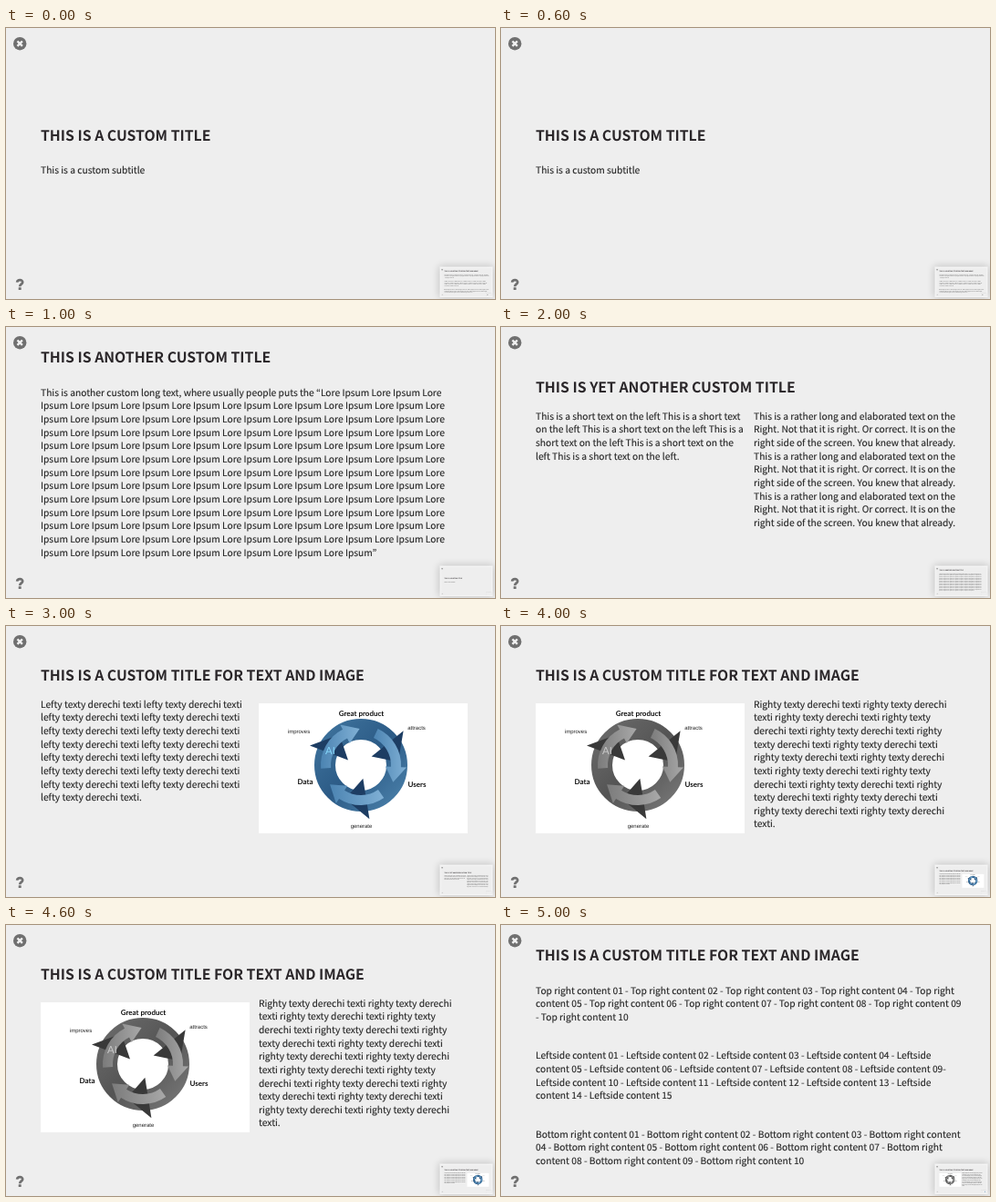
Animation, 536 px wide and 298 px high, one loop 6000 ms. Source, as an HTML page:

```html
<!DOCTYPE html>
<html lang="en">
<head>
<meta charset="utf-8">
<title>Slides</title>
<style>
  html, body { margin: 0; width: 100%; height: 100%; overflow: hidden; background: #eee; }
  svg { display: block; width: 536px; height: 298px; }
  text { font-family: "Noto Sans CJK JP", "Noto Sans CJK SC", "Noto Sans CJK", sans-serif; text-rendering: geometricPrecision; white-space: pre; }
  .title { font-size: 15.8px; font-weight: 700; fill: #2a2629; }
  .body { font-size: 10.25px; fill: #242424; stroke: #242424; stroke-width: .12px; }
  .label { font: bold 8px Lato, sans-serif; fill: #111; text-anchor: middle; }
  .note { font: 6px "Liberation Sans", sans-serif; fill: #222; text-anchor: middle; }
  .mark { font: 11.5px "Liberation Sans", sans-serif; fill: #86d8fb; }
  .gray { filter: grayscale(1); }
</style>
</head>
<body>
<svg viewBox="0 0 536 298">
  <defs>
    <linearGradient id="ring" x1="0" y1="0" x2="1" y2="1">
      <stop offset="0" stop-color="#3d719b"/><stop offset=".5" stop-color="#2c5b86"/><stop offset="1" stop-color="#477ca6"/>
    </linearGradient>
    <linearGradient id="arrow" x1="0" y1="0" x2="1" y2="0">
      <stop offset="0" stop-color="#4c84b2"/><stop offset="1" stop-color="#80b0d5"/>
    </linearGradient>
    <filter id="shadow" x="-30%" y="-40%" width="160%" height="180%"><feGaussianBlur stdDeviation="4"/></filter>
    <clipPath id="stage"><rect width="536" height="298"/></clipPath>
  </defs>
  <g id="show"></g>
</svg>
<script>
const SLIDE_MS = 1000, LINE = 14.65;

const text = (cls, x, y, s) => `<text class="${cls}" x="${x}" y="${y}">${s}</text>`;
const title = (y, s) => text('title', 38, y, s);
const body = (x, y, lines) => lines.map((s, i) => text('body', x, y + i * LINE, s)).join('');
const repeat = (n, s) => Array(n).fill(s);
const numbered = (name, from, to) =>
  Array.from({ length: to - from + 1 }, (_, i) => `${name} ${String(from + i).padStart(2, '0')}`).join(' - ');

const polar = (r, deg) => {
  const a = deg * Math.PI / 180;
  return `${(r * Math.cos(a)).toFixed(2)} ${(r * Math.sin(a)).toFixed(2)}`;
};

// Three-part cycle diagram on a white card, placed by its left edge.
function diagram(x, cls) {
  const heads = [-39, 81, 201].map(a =>
    `<path fill="#1d3d63" d="M${polar(60, a)}L${polar(15, a)}L${polar(41, a + 34)}Z"/>`).join('');
  const arrows = [175, 295, 55].map(a =>
    `<path fill="url(#arrow)" d="M${polar(44, a)}A44 44 0 0 1 ${polar(44, a + 68)}L${polar(50, a + 68)}
      L${polar(40, a + 93)}L${polar(27, a + 68)}L${polar(33, a + 68)}A33 33 0 0 0 ${polar(33, a)}Z"/>`).join('');
  return `<g class="${cls}" transform="translate(${x} 85)">
    <rect width="229" height="143" fill="#fff"/>
    <g transform="translate(112 68)">
      <circle r="39.5" fill="none" stroke="url(#ring)" stroke-width="23"/>${heads}${arrows}
      ${text('mark', -39, -12.5, 'AI')}
    </g>
    ${text('label', 112.5, 13.8, 'Great product')}${text('label', 51, 89, 'Data')}${text('label', 173.5, 91.5, 'Users')}
    ${text('note', 44, 33, 'improves')}${text('note', 173, 28.5, 'attracts')}${text('note', 112.5, 136.5, 'generate')}
  </g>`;
}

const IMAGE_TITLE = 'THIS IS A CUSTOM TITLE FOR TEXT AND IMAGE';
const slides = [
  title(124, 'THIS IS A CUSTOM TITLE') + body(38, 160.3, ['This is a custom subtitle']),

  title(39.3, 'THIS IS ANOTHER CUSTOM TITLE') + body(38, 75.7, [
    'This is another custom long text, where usually people puts the “Lore Ipsum Lore Ipsum Lore',
    ...repeat(11, 'Ipsum Lore '.repeat(8)),
    'Ipsum Lore '.repeat(6) + 'Ipsum”']),

  title(71.8, 'THIS IS YET ANOTHER CUSTOM TITLE') + body(38, 101.8, [
    'This is a short text on the left This is a short text',
    'on the left This is a short text on the left This is a',
    'short text on the left This is a short text on the',
    'left This is a short text on the left.']) +
  body(277, 101.8, repeat(3, [
    'This is a rather long and elaborated text on the',
    'Right. Not that it is right. Or correct. It is on the',
    'right side of the screen. You knew that already.']).flat()),

  title(59.5, IMAGE_TITLE) + body(38, 89.6, [
    'Lefty texty derechi texti lefty texty derechi texti',
    ...repeat(6, 'lefty texty derechi texti lefty texty derechi texti'),
    'lefty texty derechi texti.']) + diagram(277, ''),

  title(59.5, IMAGE_TITLE) + diagram(38, 'gray') + body(277, 89.6, [
    'Righty texty derechi texti righty texty derechi',
    ...repeat(2, [
      'texti righty texty derechi texti righty texty',
      'derechi texti righty texty derechi texti righty',
      'texty derechi texti righty texty derechi texti',
      'righty texty derechi texti righty texty derechi']).flat(),
    'texti.']),

  title(39.3, IMAGE_TITLE) + body(38, 75.7, [
    numbered('Top right content', 1, 4) + ' - Top right',
    'content 05 - ' + numbered('Top right content', 6, 9),
    '- Top right content 10']) +
  body(38, 147.2, [
    numbered('Leftside content', 1, 4) + ' - Leftside',
    'content 05 - ' + numbered('Leftside content', 6, 9) + '-',
    numbered('Leftside content', 10, 13) + ' - Leftside',
    'content 14 - Leftside content 15']) +
  body(38, 233.8, [
    numbered('Bottom right content', 1, 3) + ' - Bottom right content',
    '04 - ' + numbered('Bottom right content', 5, 7) + ' - Bottom right',
    'content 08 - ' + numbered('Bottom right content', 9, 10)])
];

const controls = `
  <circle cx="15.2" cy="17.2" r="7.2" fill="#707070"/>
  <path d="M12.5 14.5l5.4 5.4m0-5.4l-5.4 5.4" stroke="#f2f2f2" stroke-width="2.4"/>
  <path d="M12.1 279.6C12.6 276.5 18.2 276.3 18.2 279.5C18.2 281.8 15.2 281.6 15.2 284.3" fill="none" stroke="#707070" stroke-width="2.7"/>
  <rect x="13.7" y="285.3" width="3" height="2.8" rx=".5" fill="#707070"/>`;

// A slide carries a thumbnail of the previous one, which carries its own.
function render(index, depth) {
  const previous = (index + slides.length - 1) % slides.length;
  const thumbnail = depth === 0 ? '' : `
    <rect x="475" y="262" width="59" height="34" fill="#000" opacity=".2" filter="url(#shadow)"/>
    <rect x="475.5" y="262.5" width="58" height="33.5" fill="#f4f4f4"/>
    <g transform="translate(476.5 264) scale(.1045)">${render(previous, depth - 1)}</g>`;
  return `<g clip-path="url(#stage)"><rect width="536" height="298" fill="#eee"/>${slides[index]}${controls}${thumbnail}</g>`;
}

const show = document.getElementById('show');
const pages = slides.map((_, i) => render(i, 2));
let current = -1;

function tick() {
  const index = Math.floor(performance.now() / SLIDE_MS) % slides.length;
  if (index !== current) show.innerHTML = pages[current = index];
  requestAnimationFrame(tick);
}
tick();
</script>
</body>
</html>
```
